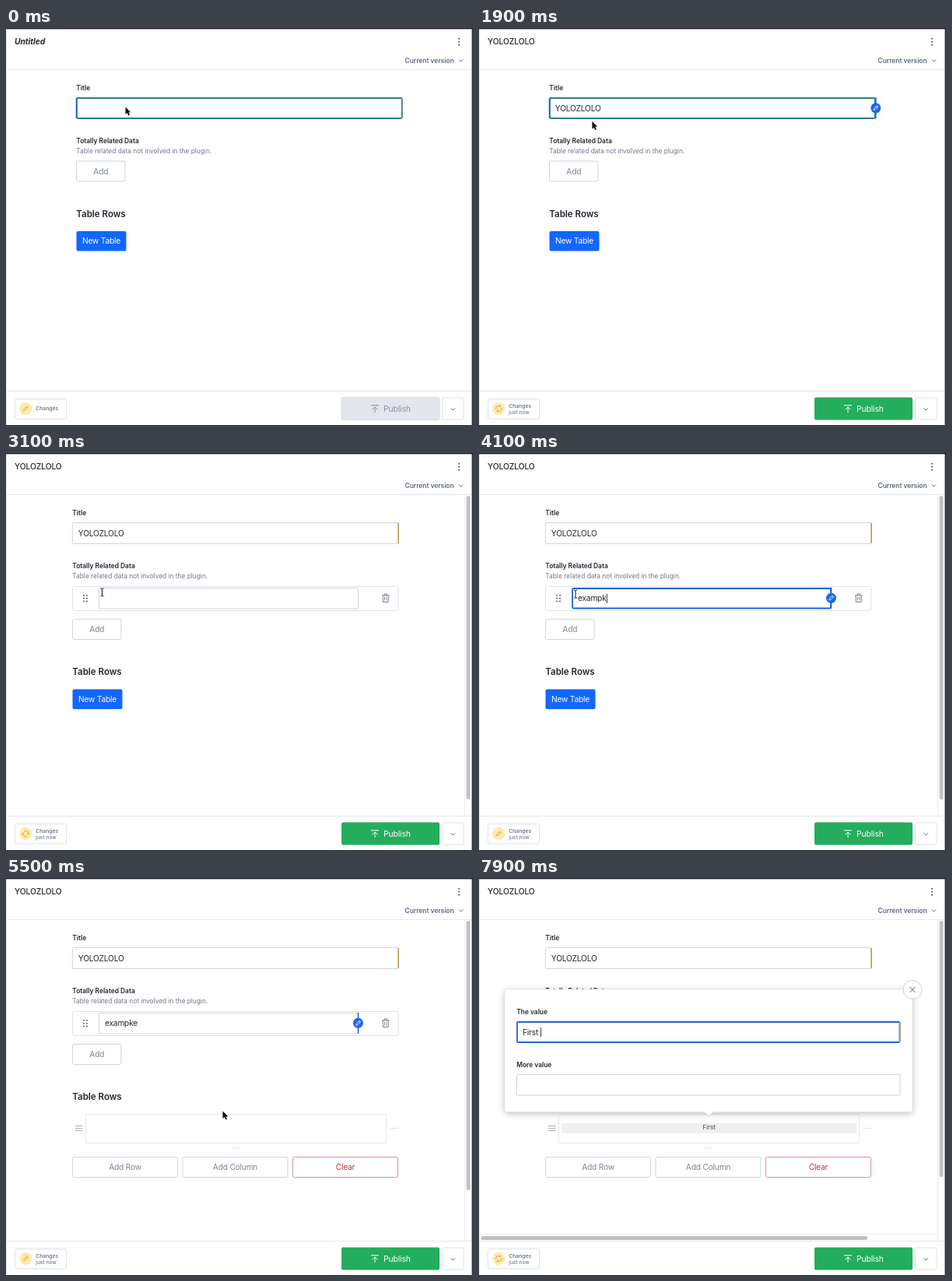
These frames come from a looping animation (600x510 px, 8 s). An HTML page with a canvas:

```html
<!DOCTYPE html>
<html lang="en">
<head>
<meta charset="utf-8">
<title>Table editor</title>
<style>
html, body { margin: 0; width: 100%; height: 100%; overflow: hidden; background: #fff; }
canvas { display: block; width: 600px; height: 510px; }
</style>
</head>
<body>
<canvas id="stage"></canvas>
<script>
const LOOP = 8000;
const FONT = 'Inter, "Liberation Sans", sans-serif';
const INK = '#22252d', GRAY = '#7b8698', SLATE = '#5d6880';
const LINE = '#d0d5dc', FAINT = '#e6e8ec', BLUE = '#2166c9', OLIVE = '#b5a04c';

const canvas = document.getElementById('stage');
const dpr = window.devicePixelRatio || 1;
canvas.width = 600 * dpr;
canvas.height = 510 * dpr;
const c = canvas.getContext('2d');

// Each field: text and the moments its characters appear
const TITLE = { text: 'YOLOZLOLO', at: [400, 500, 700, 800, 900, 1100, 1200, 1300, 1500] };
const ITEM = { text: 'exampke', at: [3500, 3600, 3700, 3800, 3900, 4000, 4300] };
const VALUE = { text: 'First ', at: [6600, 6800, 6900, 7100, 7200, 7400] };

const BLUR = 2500, ADDED = 2800, ITEM_FOCUS = 3300, TABLE = 5200, POPUP = 5900;

// Pointer keys: time, x, y
const PATH = [
  [0, 153, 101], [1700, 153, 101], [2300, 122, 172], [2900, 122, 172],
  [3200, 124, 181], [4500, 124, 181], [4900, 118, 311], [5200, 118, 311],
  [5500, 278, 299], [5750, 283, 324], [8000, 283, 324]
];

const typed = (f, t) => f.text.slice(0, f.at.filter(a => a <= t).length);
const within = (t, a, b) => t >= a && t < b;

function pointer(t) {
  let i = 1;
  while (i < PATH.length - 1 && PATH[i][0] < t) i++;
  const [t0, x0, y0] = PATH[i - 1], [t1, x1, y1] = PATH[i];
  const p = (t - t0) / (t1 - t0), e = p * p * (3 - 2 * p);
  return [x0 + (x1 - x0) * e, y0 + (y1 - y0) * e];
}

function text(s, x, y, size, color, o = {}) {
  c.font = `${o.italic ? 'italic ' : ''}${o.weight || 400} ${size}px ${FONT}`;
  c.letterSpacing = (o.gap || 0) + 'px';
  c.textAlign = o.align || 'left';
  c.textBaseline = 'alphabetic';
  c.fillStyle = color;
  c.fillText(s, x, y);
  return c.measureText(s).width;
}
const body = (s, x, y, color = INK, align = 'left') => text(s, x, y, 10.2, color, { gap: -0.2, align });
const label = (s, x, y) => text(s, x, y, 8.4, INK, { weight: 600 });

function rect(x, y, w, h, fill) {
  c.fillStyle = fill;
  c.fillRect(x, y, w, h);
}

function box(x, y, w, h, fill, stroke, r = 2, width = 1) {
  c.beginPath();
  c.roundRect(x, y, w, h, r);
  if (fill) { c.fillStyle = fill; c.fill(); }
  if (stroke) { c.strokeStyle = stroke; c.lineWidth = width; c.stroke(); }
}

function disc(x, y, r, fill) {
  c.beginPath();
  c.arc(x, y, r, 0, 7);
  c.fillStyle = fill;
  c.fill();
}

function lines(paths, color, width = 1) {
  c.beginPath();
  for (const [x, y, ...rest] of paths) {
    c.moveTo(x, y);
    for (let i = 0; i < rest.length; i += 2) c.lineTo(rest[i], rest[i + 1]);
  }
  c.strokeStyle = color;
  c.lineWidth = width;
  c.stroke();
}

function button(s, x, y, w, h, fill, stroke, color) {
  box(x + 0.5, y + 0.5, w - 1, h - 1, fill, stroke);
  body(s, x + w / 2, y + h / 2 + 3.7, color, 'center');
}

const chevron = (x, y, color) => lines([[x - 2.5, y - 1.2, x, y + 1.4, x + 2.5, y - 1.2]], color);

function pencil(x, y, color) {
  c.save();
  c.translate(x, y);
  c.rotate(Math.PI / 4);
  lines([[-1.1, -3.3, 1.1, -3.3, 1.1, 2, 0, 3.8, -1.1, 2, -1.1, -3.3], [-1.1, -1.9, 1.1, -1.9]], color, 0.8);
  c.restore();
}

function editMark(x, y) {
  rect(x - 0.8, y - 13.5, 1.6, 27, BLUE);
  disc(x, y, 6.5, '#1f68ec');
  pencil(x, y, '#fff');
}

function input(x, y, w, h, s, o = {}) {
  if (o.focus) box(x + 1, y + 1, w - 2, h - 2, '#fff', o.focus, 1.5, 1.8);
  else box(x + 0.5, y + 0.5, w - 1, h - 1, '#fff', LINE, 1);
  const base = y + h / 2 + 3.7;
  const tw = s ? body(s, x + 8, base) : 0;
  if (o.caret) rect(x + 8.3 + tw, base - 9.5, 0.9, 12, INK);
}

function header(t) {
  const s = typed(TITLE, t);
  if (s) text(s, 11, 20.7, 10.3, INK, { weight: 500, gap: -0.1 });
  else text('Untitled', 11, 20.7, 10.3, INK, { weight: 700, italic: true, gap: -0.05 });
  for (const y of [13.7, 17.7, 21.7]) disc(582, y, 1, '#4a5162');
  text('Current version', 512.5, 44.7, 8.4, SLATE, { weight: 600 });
  chevron(584.5, 41.8, SLATE);
  rect(0, 53, 598, 1, FAINT);
}

function titleField(t, x) {
  label('Title', x, 79.8);
  const focus = t < BLUR, s = typed(TITLE, t);
  input(x - 0.5, 89, 420, 28, s, { focus: focus && '#30807f', caret: focus && s && (t < 1900 || t > 2300) });
  if (focus) rect(x - 0.5, 90, 1.8, 26, BLUE);
  if (t >= ADDED) rect(x + 418, 90, 1.6, 26, OLIVE);
  else if (s) editMark(x + 419.5, 102.8);
}

function itemRow(t) {
  box(85.5, 171.5, 418.5, 31, '#fff', '#dfe3e8');
  for (const y of [183, 186.7, 190.4]) for (const x of [100, 104]) disc(x, y, 1, '#5b6270');
  const focus = within(t, ITEM_FOCUS, 5000);
  const s = typed(ITEM, t);
  input(119, 173, 334, 27.5, s, { focus: focus && BLUE, caret: focus && t < 4700 });
  if (s) editMark(452.5, 186.3);
  lines([
    [483, 183, 492.5, 183], [486, 183, 486, 181, 489.5, 181, 489.5, 183],
    [484, 183, 484.4, 191.5, 491.1, 191.5, 491.5, 183],
    [486.4, 185, 486.4, 189.5], [489.1, 185, 489.1, 189.5]
  ], '#6b7486', 0.9);
}

function table(t) {
  for (const y of [318.5, 321.5, 324.5]) rect(89, y - 0.4, 9.5, 1, '#a6abb3');
  box(102.5, 303.5, 386, 37, '#fff', '#e8e9eb', 0);
  if (t >= 5700) box(106, 315, 379, 12.7, '#f0f0f2', null, 2);
  const s = typed(VALUE, t - 100).trim();
  if (s) text(s, 295.5, 323.2, 8, '#41454d', { align: 'center' });
  rect(494, 321, 10, 1, '#e0e1e4');
  rect(290, 346.5, 10, 1, '#dcdde0');
  button('Add Row', 85, 358, 136, 27, '#fff', LINE, GRAY);
  button('Add Column', 226.5, 358, 136, 27, '#fff', LINE, GRAY);
  button('Clear', 368, 358, 136, 27, '#fff', '#d9928f', '#c5392e');
}

function form(t) {
  const added = t >= ADDED, x = added ? 85 : 90, dy = added ? 42.5 : 0;
  titleField(t, x + 0.3);
  label('Totally Related Data', x + 0.3, 147.8);
  text('Table related data not involved in the plugin.', x + 0.3, 160.8, 8.35, '#6f7889');
  if (added) itemRow(t);
  const press = within(t, BLUR, ADDED), hover = within(t, 2200, BLUR);
  button('Add', x, 170.5 + dy, 63.5, 27, press ? '#556685' : hover ? '#f1f3f6' : '#fff',
    press ? '#4e5f7d' : LINE, press ? '#dfe4ec' : GRAY);
  text('Table Rows', x + 0.3, 242.5 + dy, 11.5, INK, { weight: 600 });
  if (t >= TABLE) table(t);
  else button('New Table', x, 260.5 + dy, 65, 26.5, within(t, 4850, TABLE) ? '#0d55d8' : '#1267fc', null, '#fff');
}

function scrollbars(t) {
  if (t < ADDED) return;
  const popup = t >= POPUP;
  rect(589, 54, 1, 412, '#ebebed');
  box(591.5, 55, 5, (popup ? 384 : t >= TABLE ? 401 : 445) - 55, '#c1c1c3', null, 2.5);
  if (!popup) return;
  rect(1, 457, 588, 1, '#ebebed');
  box(2.5, 460, 496.5, 5, '#c1c1c3', null, 2.5);
}

function popover(t) {
  c.save();
  c.shadowColor = 'rgba(40,48,66,.32)';
  c.shadowBlur = 8 * dpr;
  c.shadowOffsetY = 2 * dpr;
  box(33, 143, 524, 157.5, '#fff', null, 3);
  c.restore();
  box(33, 143, 524, 157.5, '#fff', '#dcdfe4', 3, 0.6);
  c.beginPath();
  c.moveTo(288, 299.8);
  c.lineTo(295, 305.5);
  c.lineTo(302, 299.8);
  c.fillStyle = '#fff';
  c.fill();
  lines([[288, 300.5, 295, 305.8, 302, 300.5]], '#d6d9de', 0.7);

  label('The value', 48.3, 174.6);
  input(48, 184, 493.5, 28, typed(VALUE, t), { focus: BLUE, caret: true });
  if (t >= VALUE.at[0]) rect(540, 185, 1.6, 26, OLIVE);
  label('More value', 48.3, 242.6);
  input(48, 252, 493.5, 27.5, '');

  disc(557, 143.5, 12, '#fff');
  c.lineWidth = 0.9;
  c.strokeStyle = '#c9cdd4';
  c.stroke();
  lines([[553.5, 140, 560.5, 147], [560.5, 140, 553.5, 147]], '#596273');
}

function syncIcon(x, y, t) {
  const color = '#d0a43a', r = 3.6, a = t / 1000 * Math.PI * 2;
  c.save();
  c.translate(x, y);
  c.rotate(a);
  for (let i = 0; i < 2; i++) {
    c.beginPath();
    c.arc(0, 0, r, 0.35, 2.75);
    c.strokeStyle = color;
    c.lineWidth = 0.9;
    c.stroke();
    lines([[-r - 0.3, 3.1, -r + 0.3, 1.1, -r + 2.2, 1.6]], color, 0.8);
    c.rotate(Math.PI);
  }
  c.restore();
}

function footer(t) {
  rect(0, 466, 598, 44, '#fff');
  rect(0, 466, 598, 1, FAINT);
  const live = t >= 500;
  box(11.5, 476.5, 66, 25.5, '#fff', '#dde1e6');
  disc(25.3, 489, 8, '#fceaab');
  const syncing = within(t, 500, 3400) || within(t, 4300, 5300) || t >= 6700;
  if (syncing) syncIcon(25.3, 489, t);
  else pencil(25.3, 489, '#d0a43a');
  const small = { weight: 500 };
  text('Changes', 38.3, live ? 487.8 : 491.4, 6.8, SLATE, small);
  if (live) text('just now', 38.3, 495.6, 6.7, SLATE);

  const ink = live ? '#fff' : '#8791a3';
  box(431, 474.5, 126, 29, live ? '#23ad5c' : '#e3e6ec', live ? null : '#dadee5', 2);
  lines([[469, 484.8, 479, 484.8], [474, 494, 474, 487], [470.5, 490.3, 474, 486.9, 477.5, 490.3]], ink);
  text('Publish', 485, 492.8, 10.3, ink, { gap: -0.1 });
  box(560.5, 475, 27.5, 28, '#fff', '#dde1e6');
  chevron(574.2, 489.6, SLATE);
}

function arrow(x, y) {
  c.beginPath();
  c.moveTo(x, y);
  for (const [a, b] of [[0, 9.6], [2.2, 7.6], [3.8, 11], [5.5, 10.2], [3.9, 6.9], [6.7, 6.8]]) c.lineTo(x + a, y + b);
  c.closePath();
  c.lineJoin = 'round';
  c.strokeStyle = '#fff';
  c.lineWidth = 1.6;
  c.stroke();
  c.fillStyle = '#0c0c10';
  c.fill();
}

function cursor(t) {
  if (within(t, 400, 1700) || t >= 6600) return;
  const [x, y] = pointer(t);
  if (within(t, 3100, 4550)) {
    lines([[x - 2, y - 5, x, y - 4, x + 2, y - 5], [x, y - 4, x, y + 4.5], [x - 2, y + 5.5, x, y + 4.5, x + 2, y + 5.5]], '#15171c', 1);
  } else arrow(x + 0.5, y + 0.5);
}

function draw(t) {
  c.setTransform(dpr, 0, 0, dpr, 0, 0);
  rect(0, 0, 600, 510, '#fff');
  header(t);
  form(t);
  scrollbars(t);
  if (t >= POPUP) popover(t);
  footer(t);
  rect(0, 0, 1, 510, '#e0e1e5');
  rect(598.5, 0, 1.5, 510, '#2b2a36');
  rect(0, 0, 600, 1.4, '#1c1b28');
  cursor(t);
}

const start = performance.now();
function tick() {
  draw((performance.now() - start) % LOOP);
  requestAnimationFrame(tick);
}
tick();
</script>
</body>
</html>
```
